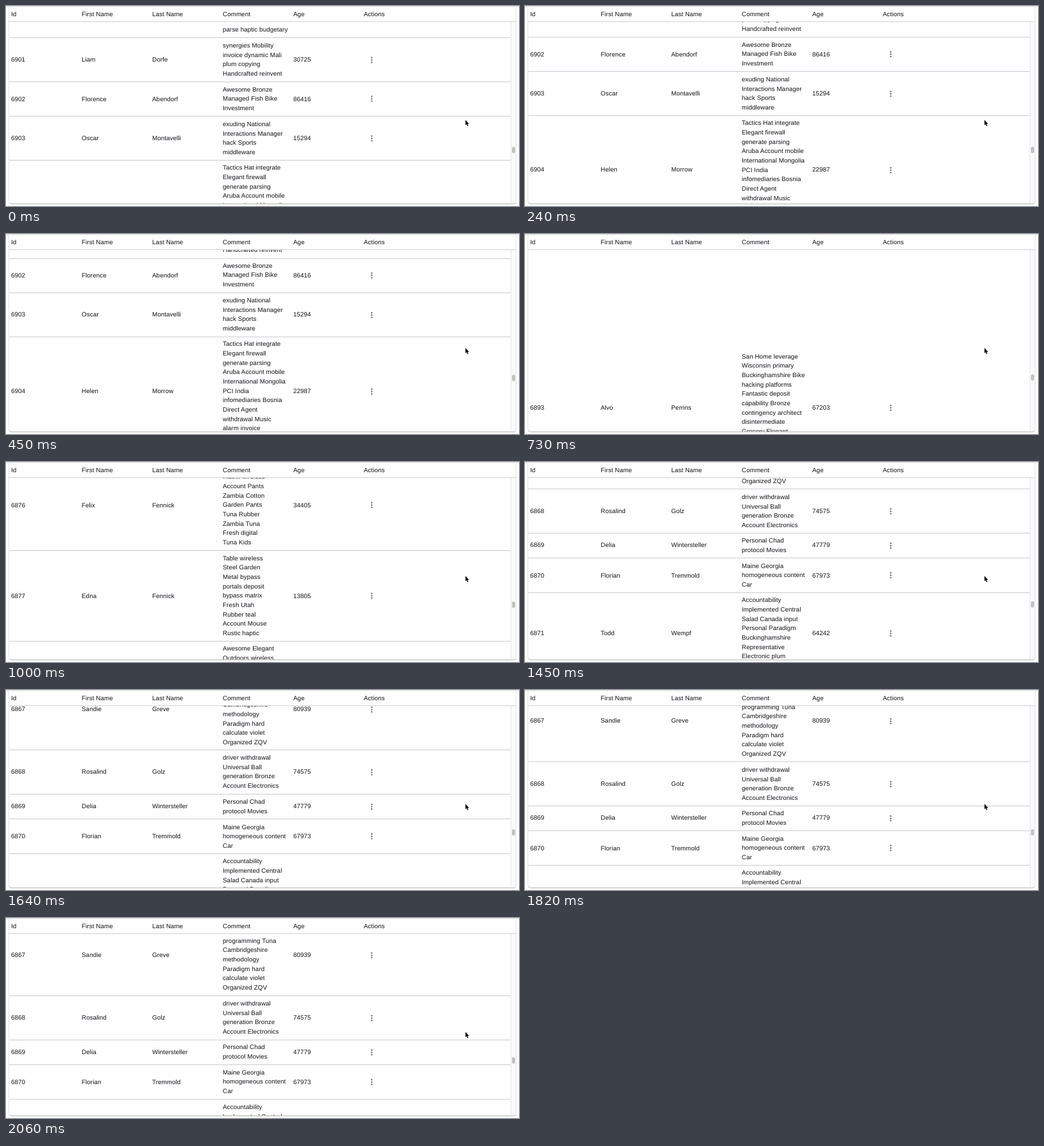
These frames come from a looping animation (800x313 px, 2090 ms). An HTML page:

```html
<!DOCTYPE html>
<html lang="en">
<head>
<meta charset="utf-8">
<title>Virtual table</title>
<style>
html, body { margin: 0; width: 100%; height: 100%; overflow: hidden; background: #fff; }
#stage {
  position: relative; width: 800px; height: 313px; overflow: hidden;
  font: 9.778px/14.667px "Liberation Sans", Arial, sans-serif;
  letter-spacing: .00938em; color: #141414; text-rendering: geometricPrecision;
}
#stage div, #stage svg { position: absolute; }
#card {
  left: 5px; top: -6px; width: 790px; height: 314.5px; background: #fefdff;
  border-radius: 4px; box-shadow: 0 1px 2px rgba(0,0,0,.3), 0 0 1px rgba(0,0,0,.18);
}
#edge { left: 0; top: 0; width: 800px; height: 2px; background: linear-gradient(#dedede, #f6f5f7); }
#head { left: 5px; top: 0; width: 790px; height: 24px; border-bottom: 1px solid #d2d2d2; }
#head .cell { top: 7px; }
#view { left: 5px; top: 25px; width: 782px; height: 283.5px; overflow: hidden; border-radius: 0 0 0 4px; }
.row { left: 0; top: 0; width: 782px; box-sizing: border-box; border-bottom: 1px solid #cbcbcb; }
.cell { white-space: pre; }
.row .cell { top: calc(50% + 1px); transform: translateY(-50%); }
.dots { left: 557.7px; top: 50%; margin-top: -7.33px; fill: #757575; }
#track {
  left: 786.5px; top: 25px; width: 8px; height: 283px; background: #faf9fb;
  border-left: 1px solid #e7e6e8; box-sizing: border-box; border-radius: 0 0 4px 0;
}
#thumb { left: 788.5px; top: 0; width: 5px; height: 10px; border-radius: 2.5px; background: #c1c1c1; }
#pointer { left: 715.2px; top: 176.8px; }
</style>
</head>
<body>
<div id="stage">
  <div id="card"></div>
  <div id="edge"></div>
  <div id="head"></div>
  <div id="view"></div>
  <div id="track"></div>
  <div id="thumb"></div>
  <svg id="pointer" width="10" height="14" viewBox="0 0 10 14">
    <path d="M1.5 1.2V9.6L3.3 7.9L4.6 10.9L6 10.3L4.7 7.4H7.2Z" fill="#000" stroke="#fff" stroke-width=".8" paint-order="stroke"/>
  </svg>
</div>
<script>
const LOOP = 2090, STEP = 30, LINE = 14.667, PAD = 10, MIN_ROW = 35.2;
const FIRST = 6867, LAST = 6904;
const COLS = [3, 113, 223, 333, 443, 553];
const $ = id => document.getElementById(id);

// id: first name, last name, age, comment lines
const known = {
  6867: ["Sandie", "Greve", 80939, "optical Concrete|Bedfordshire FTP|programming Tuna|Cambridgeshire|methodology|Paradigm hard|calculate violet|Organized ZQV"],
  6868: ["Rosalind", "Golz", 74575, "driver withdrawal|Universal Ball|generation Bronze|Account Electronics"],
  6869: ["Delia", "Wintersteller", 47779, "Personal Chad|protocol Movies"],
  6870: ["Florian", "Tremmold", 67973, "Maine Georgia|homogeneous content|Car"],
  6871: ["Todd", "Wempf", 64242, "Accountability|Implemented Central|Salad Canada input|Personal Paradigm|Buckinghamshire|Representative|Electronic plum|Director Armenia"],
  6872: ["Leopold", "Hasgrove", 53425, "incubate interactive|Ball tan hacking Auto|Mexico synthesize|ASCII primary harness|SCSI Credit global|Handmade|Pennsylvania|Decentralized|compressing Luxurious"],
  6873: ["Dorothea", "Harm", 80737, "Rustic red"],
  6893: ["Alvo", "Perrins", 67203, "San Home leverage|Wisconsin primary|Buckinghamshire Bike|hacking platforms|Fantastic deposit|capability Bronze|contingency architect|disintermediate|Grocery Elegant|Cotton matrix|bypass Georgia|Movies"],
  6900: ["Ingrid", "Solwick", 41836, "Steel synergize|open-source Chair|Intelligent teal|bandwidth Alaska|parse haptic budgetary"],
  6901: ["Liam", "Dorfe", 30725, "synergies Mobility|invoice dynamic Mali|plum copying|Handcrafted reinvent"],
  6902: ["Florence", "Abendorf", 86416, "Awesome Bronze|Managed Fish Bike|Investment"],
  6903: ["Oscar", "Montavelli", 15294, "exuding National|Interactions Manager|hack Sports|middleware"],
  6904: ["Helen", "Morrow", 22987, "Tactics Hat integrate|Elegant firewall|generate parsing|Aruba Account mobile|International Mongolia|PCI India|infomediaries Bosnia|Direct Agent|withdrawal Music|alarm invoice|Cotton"]
};

const words = "Account array Awesome bypass Chips Cotton deposit digital Elegant Fish Fresh Garden global Granite haptic invoice Islands Kids matrix Metal mobile Mouse neural Outdoors parse Pants Plastic portals Rubber Rustic scalable Soap Steel Table teal Tuna Utah wireless yellow Zambia".split(" ");
const firsts = "Alma Bruno Cora Dexter Edna Felix Greta Hugo Iris Jonas".split(" ");
const lasts = "Aldmoor Benfeld Corwick Drassel Elmhart Fennick Gorlund Hestrop".split(" ");

let seed = 41;
const rand = n => {
  seed = (seed * 16807) % 2147483647;
  return Math.floor(seed / 2147483647 * n);
};
const pick = list => list[rand(list.length)];
const invent = () => {
  const lines = Array.from({ length: 3 + rand(9) }, () => pick(words) + " " + pick(words));
  return [pick(firsts), pick(lasts), 10000 + rand(89999), lines.join("|")];
};

function addCell(parent, col, text) {
  const cell = document.createElement("div");
  cell.className = "cell";
  cell.style.left = COLS[col] + "px";
  cell.textContent = text;
  parent.append(cell);
}

["Id", "First Name", "Last Name", "Comment", "Age", "Actions"].forEach((t, i) => addCell($("head"), i, t));

const DOTS = '<svg class="dots" width="14.667" height="14.667" viewBox="0 0 24 24">' +
  [6, 12, 18].map(y => `<circle cx="12" cy="${y}" r="2"/>`).join("") + "</svg>";

const rows = {};
let top0 = 0;
for (let id = FIRST; id <= LAST; id++) {
  const [first, last, age, comment] = known[id] || invent();
  const lines = comment.split("|");
  const height = Math.max(lines.length * LINE + PAD, MIN_ROW);
  const el = document.createElement("div");
  el.className = "row";
  el.style.height = height + "px";
  el.innerHTML = DOTS;
  [id, first, last, lines.join("\n"), age].forEach((t, i) => addCell(el, i, t));
  $("view").append(el);
  // The middle lies above the 1px bottom border
  rows[id] = { el, height, top: top0, mid: top0 + (height - 1) / 2 };
  top0 += height;
}

// Content shift that puts the middle of a row at stage height y
const shiftFor = (id, y) => y - 25 - rows[id].mid;

const start = shiftFor(6902, 145.4);
const turn = 535, fling = 730;
const flung = shiftFor(6893, 272.2);
const rest = shiftFor(6871, 89.6) + 260;

// Distance left to the resting place; decays exponentially between keys
const left = [[fling, rest - flung], [1240, 260], [1450, 81.5], [1820, 11.5], [2060, 2]];

const glide = t => start - 83 * (1 - Math.exp(-t / 130));

function shiftAt(t) {
  if (t < turn) return glide(t);
  if (t < fling) {
    const p = (t - turn) / (fling - turn), from = glide(turn);
    return from + (flung - from) * p * p;
  }
  let i = 0;
  while (i < left.length - 2 && t >= left[i + 1][0]) i++;
  const [ta, a] = left[i], [tb, b] = left[i + 1];
  return rest - a * Math.pow(b / a, (t - ta) / (tb - ta));
}

// Steady updates with short stalls between the runs
const runs = [[0, 450], [550, 760], [820, 910], [970, 1450], [1520, 1640], [1700, 2060]];
function snap(t) {
  const [a, b] = runs.filter(r => r[0] <= t).pop();
  return Math.min(b, a + Math.floor((t - a) / STEP) * STEP);
}

// Rows above this one are not rendered yet
const renderedFrom = t => t < 820 ? 6893 : t < 970 ? 6881 : FIRST;

function draw(time) {
  const t = snap(time % LOOP), shift = shiftAt(t), from = renderedFrom(t);
  for (let id = FIRST; id <= LAST; id++) {
    const { el, top, height } = rows[id], y = top + shift;
    const shown = id >= from && y < 284 && y + height > 0;
    el.style.display = shown ? "block" : "none";
    if (shown) el.style.transform = `translateY(${y.toFixed(2)}px)`;
  }
  $("thumb").style.transform = `translateY(${(220.2 - (shift - start) / 1500).toFixed(2)}px)`;
}

const begin = performance.now();
function tick() {
  draw(performance.now() - begin);
  requestAnimationFrame(tick);
}
tick();
</script>
</body>
</html>
```
